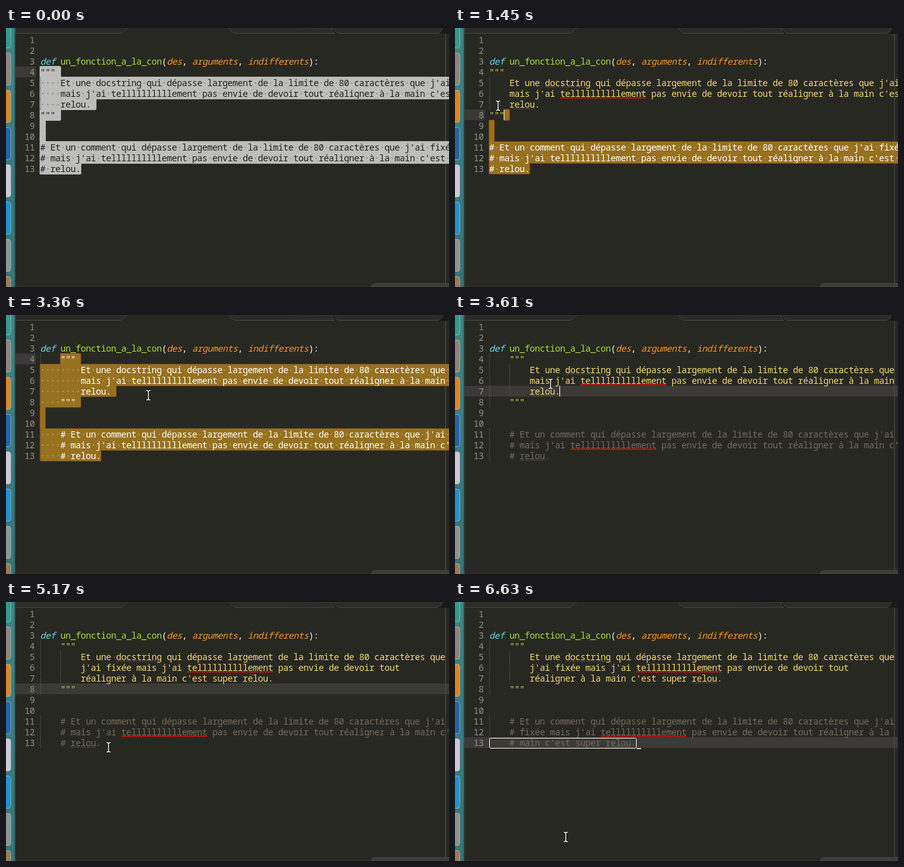
An HTML page for the animation above (6730 ms loop, 700 by 410 pixels).

```html
<!DOCTYPE html>
<html lang="fr">
<head>
<meta charset="utf-8">
<title>Editor</title>
<style>
html, body { margin: 0; width: 100%; height: 100%; overflow: hidden; background: #272822; }
svg { display: block; width: 700px; height: 410px; }
text {
  font: 14px "Noto Sans Mono", "DejaVu Sans Mono", monospace;
  letter-spacing: -.4px;
  white-space: pre;
  font-variant-ligatures: none;
}
.num { fill: #8f908a; }
.doc { fill: #f2d96b; }
.quote { fill: #c5d94a; }
.note { fill: #756a58; }
.plain { fill: #f8f8f2; }
.name { fill: #a6e22e; }
.key { fill: #66d9ef; font-style: italic; }
.arg { fill: #fd971f; font-style: italic; }
.bad { fill: none; stroke: #e00f0f; stroke-width: 1.2; }
.odd { fill: none; stroke: #77755f; stroke-width: .9; stroke-dasharray: 1.5 1; }
.guide { stroke: #5c5d54; stroke-dasharray: 1 1; }
.edge { stroke-width: 3.6; stroke-linejoin: round; }
.body { stroke-width: 2; stroke-linejoin: round; }
.gold .edge { stroke: #84401b; fill: #84401b; }
.gold .body { stroke: #96711f; fill: #96711f; }
.gold .picked { fill: #fff; }
.gold .dots { fill: #c9a961; }
.grey .edge { stroke: #d4d4d2; fill: #d4d4d2; }
.grey .body { stroke: #bdbdbc; fill: #bdbdbc; }
.grey .picked { fill: #20211d; }
.grey .dots { fill: #77776f; }
</style>
</head>
<body>
<svg viewBox="0 0 700 410">
  <defs>
    <linearGradient id="sea" x2="0" y2="1">
      <stop offset="0" stop-color="#3f8583"/>
      <stop offset=".5" stop-color="#397b83"/>
      <stop offset="1" stop-color="#377476"/>
    </linearGradient>
    <clipPath id="clip"><path id="clipShape"/></clipPath>
  </defs>
  <rect width="700" height="410" fill="#272822"/>

  <rect id="active" height="17" x="15" fill="#3b3a37"/>
  <path d="M694.5 10V404" stroke="#4b4c46"/>
  <g id="base"></g>
  <g id="selection">
    <path class="edge"/><path class="body"/>
    <g id="over" clip-path="url(#clip)"></g>
  </g>
  <g id="guides"></g>
  <g id="numbers"></g>
  <rect id="caret" width="1" height="17" fill="#fff"/>
  <g id="result" fill="none" stroke="#f8f8f2">
    <rect x="54.5" y="215.5" width="232" height="16" rx="2"/>
    <path d="M287 232H294" stroke-width="1.5"/>
  </g>

  <rect x="15" width="685" height="9" fill="#191a17"/>
  <g fill="#2b2c28" stroke="#45463f">
    <path d="M15 -1H196Q190 0 188 5Q187 8 181 8.5H15Z"/>
    <path d="M350 -1Q354 0 356 5Q357 8 363 8.5H520Q516 7 515 0Z"/>
    <path d="M515 -1Q518 0 520 5Q521 8 527 8.5H682Q688 7 690 -1Z"/>
  </g>
  <path d="M194 0H350Q354 1 356 6Q357 9 360 10H184Q188 8 190 5Q191 1 194 0Z" fill="#272822"/>
  <rect x="15" y="408" width="685" height="2" fill="#352827"/>
  <path d="M577 410Q578 404.500 585 404.500H700V410Z" fill="#3d3c39" stroke="#4a4945"/>

  <rect width="15" height="410" fill="url(#sea)"/>
  <rect x="13.500" width="1.500" height="410" fill="#24504f"/>
  <g id="dock" stroke="#c5d3d0" stroke-opacity=".55"></g>

  <g id="mouse" fill="none" stroke-linecap="round">
    <path id="beam" d="M-2.800 -7.500Q0 -7.500 0 -5.500V5.500Q0 7.500 -2.800 7.500M2.800 -7.500Q0 -7.500 0 -5.500M2.800 7.500Q0 7.500 0 5.500" stroke="#0b0b0b" stroke-width="3.200"/>
    <use href="#beam" id="core"/>
    <path d="M-2.800 -7.500Q0 -7.500 0 -5.500V5.500Q0 7.500 -2.800 7.500M2.800 -7.500Q0 -7.500 0 -5.500M2.800 7.500Q0 7.500 0 5.500" stroke="#fff" stroke-width="1.400"/>
  </g>
</svg>
<script>
const LOOP = 6730, LEFT = 54, TOP = 10, CELL = 8, ROW = 17;
const el = id => document.getElementById(id);
const colX = c => LEFT + c * CELL;
const rowY = r => TOP + (r - 1) * ROW;

// Document versions
const word = 'te' + 'l'.repeat(10) + 'ement';
const head = ['', '', 'def un_fonction_a_la_con(des, arguments, indifferents):'];
const intro = 'qui dépasse largement de la limite de 80 caractères que';
const middle = `mais j'ai ${word} pas envie de devoir tout`;
const ending = "réaligner à la main c'est super";
const docLong = ['"""', `    Et une docstring ${intro} j'ai fixée`, `    ${middle} ${ending}`, '    relou.', '"""'];
const docWrap = ['"""', `    Et une docstring ${intro}`, `    j'ai fixée ${middle}`, `    ${ending} relou.`, '"""'];
const noteLong = [`# Et un comment ${intro} j'ai fixée`, `# ${middle} ${ending}`, '# relou.'];
const noteWrap = [`# Et un comment ${intro} j'ai`, `# fixée ${middle} réaligner à la`, "# main c'est super relou."];
const indent = lines => lines.map(s => '    ' + s);
const build = (doc, note) => [...head, ...doc, '', '', ...note];
const versions = [
  build(docLong, noteLong),
  build(indent(docLong), indent(noteLong)),
  build(indent(docWrap), indent(noteLong)),
  build(indent(docWrap), indent(noteWrap))
];

// Pointer path: time, x, y
const path = [
  [490, 23, 292], [860, 201, 235], [1020, 201, 235], [1180, 144, 199],
  [1400, 72, 128], [1650, 40, 87], [1700, 40, 86], [1950, 40, 80],
  [2060, 40, 80], [2310, 40, 73], [2510, 40, 73], [2560, 46, 81],
  [2710, 46, 81], [3110, 165, 118], [3210, 165, 118], [3360, 225, 127],
  [3460, 185, 121], [3860, 95, 88], [4170, 95, 88], [4420, 198, 205],
  [4570, 196, 272], [4820, 168, 243], [4920, 168, 243], [5170, 162, 230],
  [5620, 102, 200], [5780, 94, 184], [5880, 94, 184], [6580, 169, 360],
  [6630, 175, 372]
];
// The screen refreshes every 50 ms, counted from these moments
const beats = [0, 490, 860, 1020, 1180, 1650, 2110, 4220, 5680];

// What the editor does: drags have an anchor and a release time
const steps = [
  { at: 0, text: 0, sel: [4, 0, 13, 8], grey: true },
  { at: 1020, text: 0, anchor: [13, 8], release: 2310 },
  { at: 2910, text: 1, sel: [4, 4, 13, 12] },
  { at: 3460, text: 1, anchor: [7, 14], release: 3860 },
  { at: 4620, text: 2, row: 8 },
  { at: 5220, text: 2, anchor: [13, 12], release: 5780 },
  { at: 6180, text: 3, row: 13, boxed: true }
];

function snap(t) {
  const start = beats.filter(b => b <= t).pop();
  return start + Math.floor((t - start) / 50) * 50;
}

function pointer(t) {
  const i = path.findIndex(p => p[0] > t);
  if (i < 0) return path[path.length - 1].slice(1);
  if (i === 0) return path[0].slice(1);
  const [t0, x0, y0] = path[i - 1], [t1, x1, y1] = path[i];
  const k = (t - t0) / (t1 - t0);
  return [x0 + (x1 - x0) * k, y0 + (y1 - y0) * k];
}

function cellAt([x, y], lines) {
  const row = Math.max(1, Math.min(lines.length, Math.floor((y - TOP) / ROW) + 1));
  const col = Math.max(0, Math.min(lines[row - 1].length, Math.round((x - LEFT) / CELL)));
  return [row, col];
}

const text = (row, col, body, cls) =>
  `<text x="${colX(col)}" y="${rowY(row) + 14}" class="${cls}">${body}</text>`;

function squiggle(row, col, length, cls) {
  let d = `M${colX(col)} ${rowY(row) + 16.5}`;
  for (let i = 0; i < length * CELL / 4; i++) d += 'l2 -2l2 2';
  return `<path class="${cls}" d="${d}"/>`;
}

function baseLine(line, i) {
  const row = i + 1, trimmed = line.trimStart(), col = line.length - trimmed.length;
  if (!trimmed) return '';
  if (row === 3) {
    const marked = line
      .replace(/des|arguments|indifferents/g, '<tspan class="arg">$&</tspan>')
      .replace(/^def/, '<tspan class="key">def</tspan>')
      .replace(/un_\w+/, '<tspan class="name">$&</tspan>');
    return text(row, 0, marked, 'plain');
  }
  const cls = trimmed === '"""' ? 'quote' : row > 10 ? 'note' : 'doc';
  let out = text(row, col, trimmed, cls);
  for (const m of line.matchAll(/tel+ement|docstring|relou/g))
    out += squiggle(row, m.index, m[0].length, m[0] === word ? 'bad' : 'odd');
  return out;
}

function overLine(line, i) {
  const trimmed = line.trimStart();
  const dots = line.replace(/[^ ]/g, '\u00a0').replace(/ /g, '·');
  return text(i + 1, line.length - trimmed.length, trimmed, 'picked') + text(i + 1, 0, dots, 'dots');
}

function guideLine(line, i) {
  let out = '';
  for (let c = 0; c < line.search(/\S/); c += 4)
    out += `<path class="guide" d="M${colX(c) + .5} ${rowY(i + 1)}v${ROW}"/>`;
  return out;
}

function selShape([r0, c0, r1, c1], lines, inset) {
  let d = '';
  for (let r = r0; r <= r1; r++) {
    const x0 = colX(r === r0 ? c0 : 0) + inset;
    const x1 = colX(r === r1 ? c1 : lines[r - 1].length + 1) - inset;
    if (x1 > x0) d += `M${x0} ${rowY(r) + inset}H${x1}v${ROW - 2 * inset}H${x0}Z`;
  }
  return d;
}

const show = (node, on) => node.setAttribute('visibility', on ? 'visible' : 'hidden');

let shownText = -1;
function showText(n) {
  if (n === shownText) return;
  shownText = n;
  const lines = versions[n];
  el('base').innerHTML = lines.map(baseLine).join('');
  el('over').innerHTML = lines.map(overLine).join('');
  el('guides').innerHTML = lines.map(guideLine).join('');
}

function draw(now) {
  const t = now % LOOP, q = snap(t);
  const step = steps.filter(s => s.at <= t).pop();
  const lines = versions[step.text];
  showText(step.text);

  let sel = step.sel, row = step.row || 4, caret = null;
  if (step.anchor) {
    caret = cellAt(pointer(Math.min(q - 50, step.release)), lines);
    row = caret[0];
    const [a, b] = [caret, step.anchor].sort((m, n) => m[0] - n[0] || m[1] - n[1]);
    if (a[0] !== b[0] || a[1] !== b[1]) sel = [...a, ...b];
  }

  const box = el('selection');
  show(box, sel);
  if (sel) {
    box.setAttribute('class', step.grey ? 'grey' : 'gold');
    const d = selShape(sel, lines, 1);
    box.querySelector('.edge').setAttribute('d', d);
    box.querySelector('.body').setAttribute('d', d);
    el('clipShape').setAttribute('d', selShape(sel, lines, 0));
  }
  el('active').setAttribute('y', rowY(row));
  el('active').setAttribute('width', sel ? 32 : 685);

  show(el('caret'), caret);
  if (caret) {
    el('caret').setAttribute('x', colX(caret[1]) - 1);
    el('caret').setAttribute('y', rowY(caret[0]));
  }
  show(el('result'), step.boxed);

  const [x, y] = pointer(q);
  show(el('mouse'), t >= path[0][0]);
  el('mouse').setAttribute('transform', `translate(${Math.round(x)} ${Math.round(y)})`);
}

el('core').remove();
el('numbers').innerHTML = versions[0].map((_, i) =>
  text(i + 1, i < 9 ? -2.1 : -3.1, i + 1, 'num')).join('');
el('dock').innerHTML = ['#2f9c8d', '#8d8579', '#d98524', '#2465a8', '#cfc6d6', '#1f93d0', '#8f9492', '#9c7a55']
  .map((c, i) => `<rect x="-40.500" y="${i * 59 - 19.5}" width="48" height="51" rx="4" fill="${c}"/>`).join('');

function tick() {
  draw(performance.now());
  requestAnimationFrame(tick);
}
tick();
</script>
</body>
</html>
```
